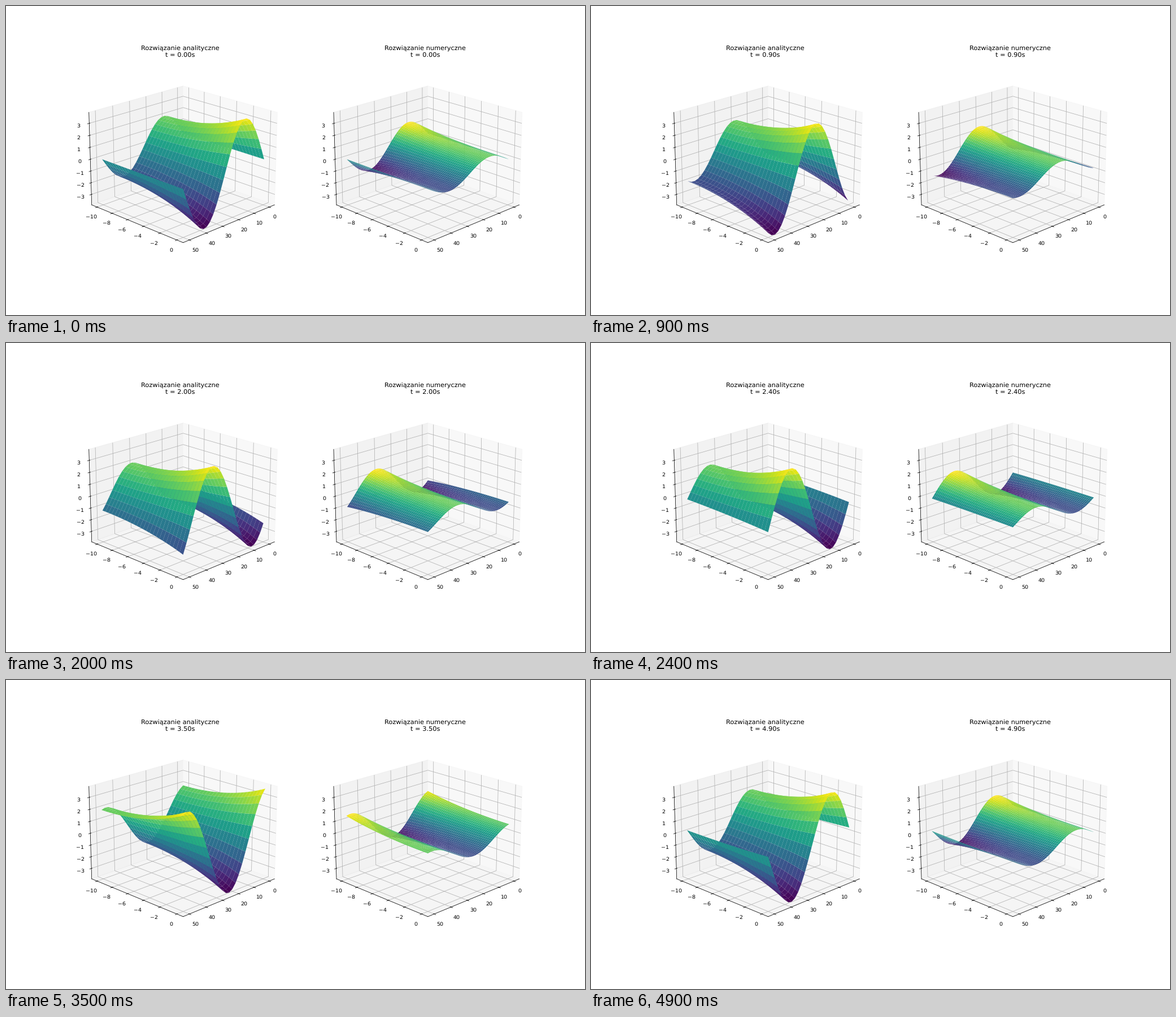
Write a matplotlib script that moves like this. It is 1025 px wide and 547 px high and loops after 5 s.

```python
import numpy as np
import matplotlib.pyplot as plt
from matplotlib.animation import FuncAnimation

LENGTH, DEPTH, PERIOD = 50.0, 10.0, 5.0
GRAVITY, HEIGHT = 9.81, 1.0
FRAMES, STEP = 50, 0.1
DPI = 547 / 8

k = 2 * np.pi / LENGTH
omega = 2 * np.pi / PERIOD
peak = HEIGHT / 2 * GRAVITY / omega


def grid(n):
    return np.meshgrid(np.linspace(0, LENGTH, n), np.linspace(-DEPTH, 0, n))


def analytic(x, z, t):
    profile = np.cosh(k * (z + DEPTH)) / np.cosh(k * DEPTH)
    return peak * profile * np.sin(k * x - omega * t)


def numeric(x, z, t):
    return 0.805 * np.cosh(k * z) * np.sin(k * x - omega * t)


plt.rcParams["text.hinting"] = "none"
fig = plt.figure(figsize=(1025 / DPI, 8), dpi=DPI)
panels = []
for i, (name, potential, n) in enumerate([
        ("Rozwiązanie analityczne", analytic, 26),
        ("Rozwiązanie numeryczne", numeric, 50)]):
    ax = fig.add_subplot(1, 2, i + 1, projection="3d")
    ax.view_init(elev=20, azim=45)
    ax.set_zlim(-peak, peak)
    panels.append((ax, name, potential, grid(n)))


def update(frame):
    t = frame * STEP
    for ax, name, potential, (x, z) in panels:
        for old in list(ax.collections):
            old.remove()
        ax.plot_surface(x, z, potential(x, z, t), cmap="viridis")
        ax.set_title(f"{name}\nt = {t:.2f}s")


anim = FuncAnimation(fig, update, frames=FRAMES, init_func=lambda: update(0),
                     interval=100, repeat=True, repeat_delay=0)
plt.show()
```
